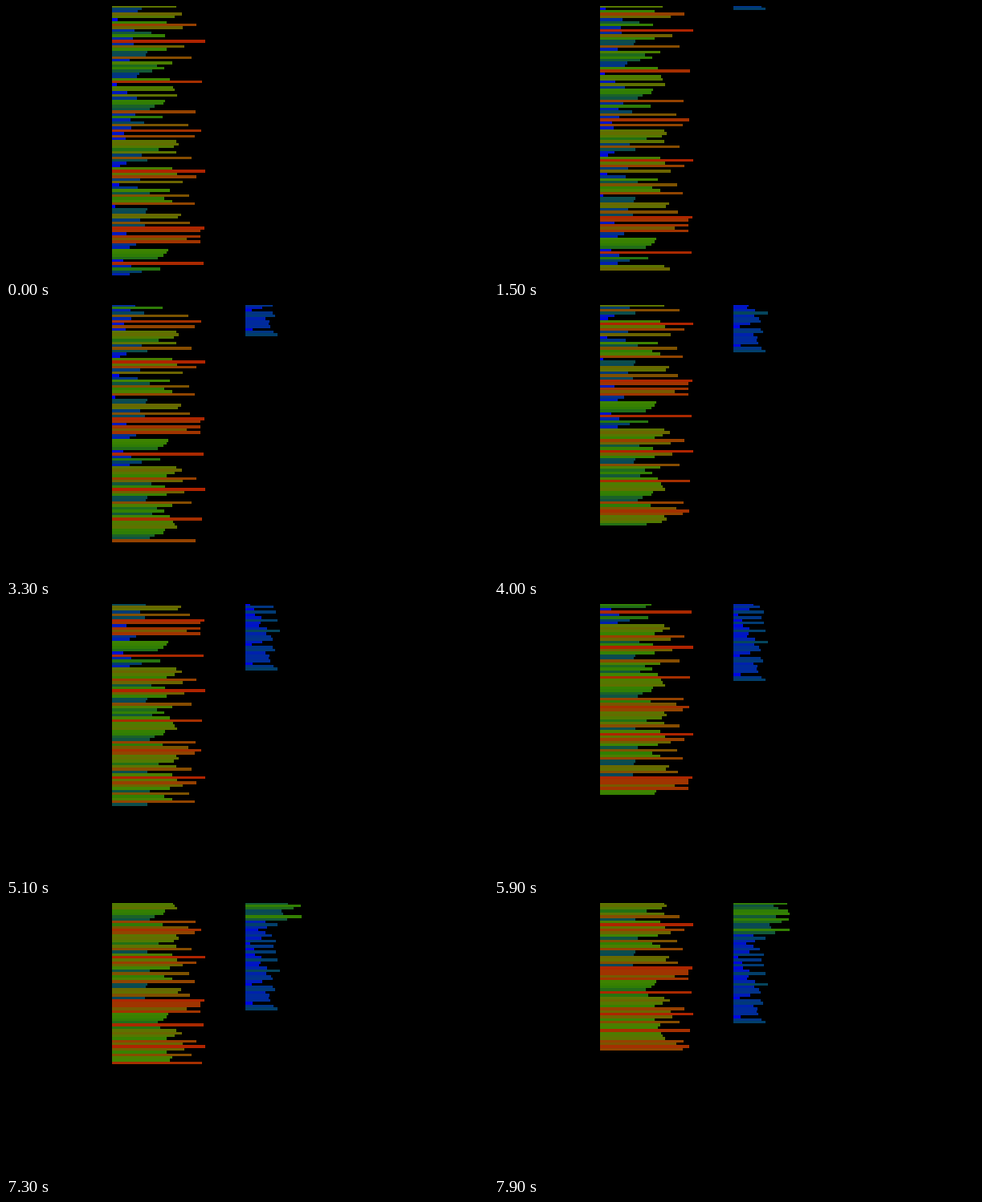
Animation of 600x338 px, one loop 8 s. Source, as a matplotlib script:

```python
import numpy as np
import matplotlib.pyplot as plt
from matplotlib.animation import FuncAnimation
from matplotlib.patches import Rectangle

W, H, DPI = 600, 338, 100
FRAMES, INTERVAL = 80, 100
START, OPS_PER_FRAME = 13, 2
PITCH = H / 100
LEFT_A, LEFT_B = 132.4, 298.4

VALUES = [
    80, 37, 32, 87, 78, 7, 68, 105, 88, 28, 49, 66, 26, 116, 27, 90, 68, 44, 42, 99,
    22, 75, 56, 65, 50, 34, 31, 72, 112, 6, 76, 78, 19, 81, 31, 66, 64, 53, 47, 104,
    29, 63, 23, 40, 95, 24, 111, 15, 103, 17, 80, 83, 77, 58, 80, 37, 99, 44, 18, 10,
    75, 116, 81, 105, 35, 88, 9, 32, 72, 47, 96, 65, 75, 103, 4, 44, 42, 86, 82, 35,
    97, 41, 115, 110, 18, 110, 93, 110, 30, 22, 70, 68, 64, 57, 14, 114, 24, 60, 37, 22,
]

STOPS = [0, 8, 18, 28, 38, 44, 50, 58, 65, 72, 81, 88, 96, 104, 110, 116]
RED = [0, 0, 0, 0, 2, 12, 20, 35, 50, 65, 95, 108, 125, 148, 160, 175]
GREEN = [0, 5, 25, 45, 65, 77, 90, 112, 127, 132, 113, 100, 82, 66, 52, 36]
BLUE = [245, 225, 190, 150, 102, 76, 54, 20, 2, 0, 0, 0, 0, 0, 0, 0]


def color(v):
    return tuple(np.interp(v, STOPS, c) / 255 for c in (RED, GREEN, BLUE))


def sort_states(total):
    """Push the smallest third of stack A to B, over and over, one operation per state."""
    a, b = list(range(len(VALUES))), []
    states = [(a[:], b[:])]
    left = 0
    while len(states) <= total:
        if left == 0:
            left = len(a) // 3
            limit = sorted(VALUES[k] for k in a)[left - 1]
        k = a.pop(0)
        if VALUES[k] <= limit:
            b.insert(0, k)
            left -= 1
        else:
            a.append(k)
        states.append((a[:], b[:]))
    return states


states = sort_states(OPS_PER_FRAME * (FRAMES - START))

fig = plt.figure(figsize=(W / DPI, H / DPI), dpi=DPI, facecolor="black")
ax = fig.add_axes([0, 0, 1, 1])
ax.set_xlim(0, W)
ax.set_ylim(H, 0)
ax.axis("off")

bars = [ax.add_patch(Rectangle((0, 0), 1, PITCH, facecolor=color(v), linewidth=0))
        for v in VALUES]


def place(stack, left, scale, pad):
    for row, k in enumerate(stack):
        bars[k].set_bounds(left, (row - 0.5) * PITCH, VALUES[k] * scale + pad, PITCH)


def update(n):
    a, b = states[OPS_PER_FRAME * max(0, n - START)]
    place(a, LEFT_A, 1, 0)
    place(b, LEFT_B, 1.03, 1.5)
    return bars


anim = FuncAnimation(fig, update, frames=FRAMES, interval=INTERVAL,
                     repeat=True, repeat_delay=0, blit=False)
plt.show()
```
